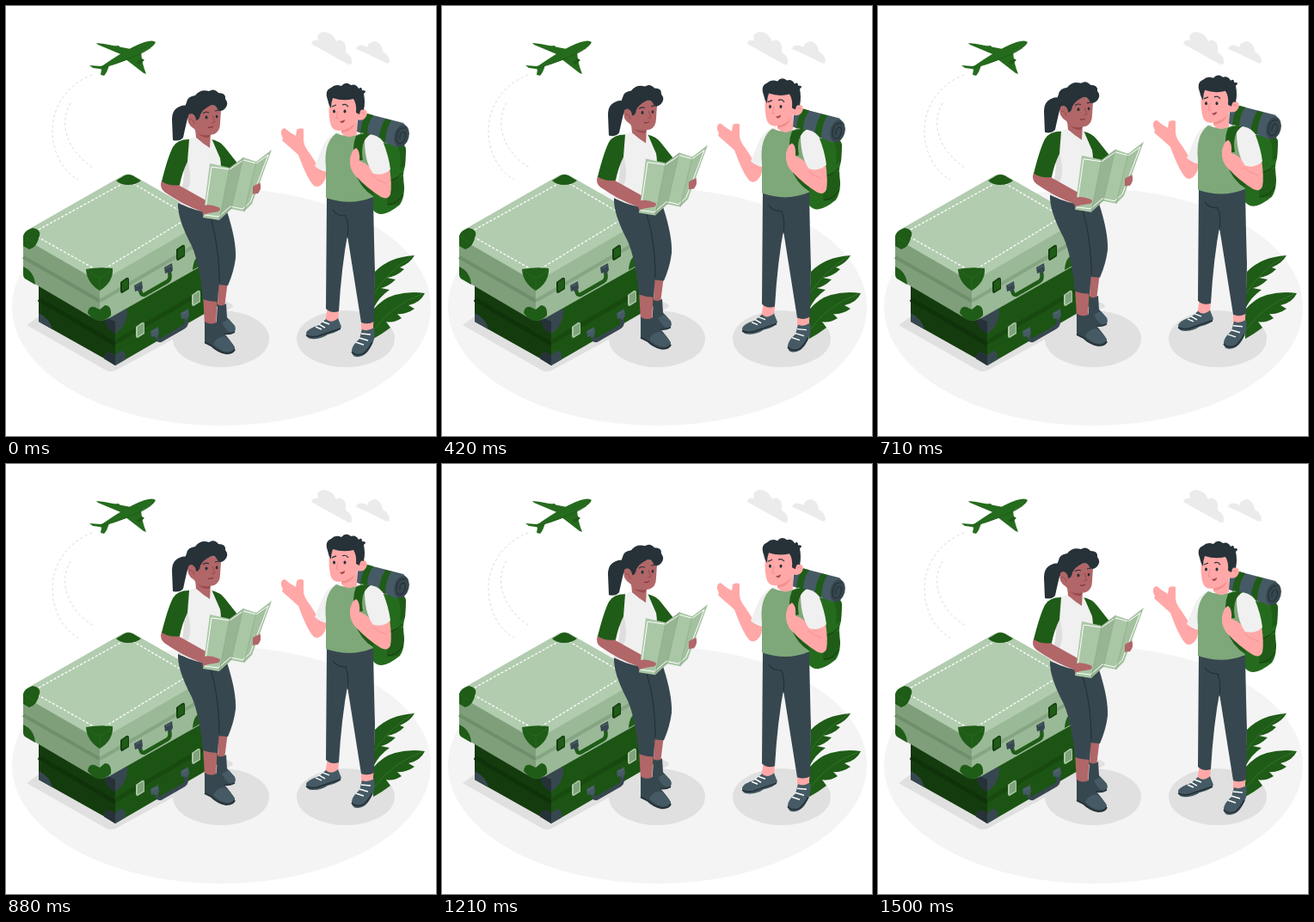
Recreate the animation shown at these times as an HTML page with a canvas. Size 500 by 500 pixels, loop 1.54 s.

```html
<!DOCTYPE html>
<html lang="en">
<head>
<meta charset="utf-8">
<title>Travellers</title>
<style>
html, body { margin: 0; width: 100%; height: 100%; overflow: hidden; background: #fff; }
canvas { display: block; width: 500px; height: 500px; }
</style>
</head>
<body>
<canvas id="stage" width="500" height="500"></canvas>
<script>
const ctx = document.getElementById('stage').getContext('2d');
const LOOP = 1540, STEPS = 37, LIFT = 10;

const green = '#1f5c17', leaf = '#256b1d', deep = '#143b0e', sage = '#a9c7a5',
  slate = '#37474f', steel = '#455a64', ink = '#263238', white = '#fff',
  brown = '#b16668', brownDark = '#9a4a4d', pink = '#ffa8a7', pinkDark = '#f28f8f',
  shadow = '#e0e0e0', cloud = '#ebebeb', cloth = '#f0f0f0', fold = '#dedede';

function fill(color, d) {
  ctx.fillStyle = color;
  ctx.fill(new Path2D(d));
}
function line(color, width, d, dash = []) {
  ctx.strokeStyle = color;
  ctx.lineWidth = width;
  ctx.setLineDash(dash);
  ctx.stroke(new Path2D(d));
}
function oval(color, x, y, rx, ry, turn = 0) {
  ctx.fillStyle = color;
  ctx.beginPath();
  ctx.ellipse(x, y, rx, ry, turn, 0, Math.PI * 2);
  ctx.fill();
}

function ground() {
  oval('#f4f4f4', 250.5, 350, 243.5, 138);
  oval(shadow, 250, 387, 56, 33);
  oval(shadow, 395, 387, 57, 33);
  fill(shadow, 'M24 371L38 361L127 410L246 338L263 347Q265 350 262 351L127 424Q122 426 117 424Z');
}

function sky() {
  fill(cloud, 'M355 44Q356 39 363 40Q360 32 369 30Q379 30 384 41Q389 37 394 43Q396 48 395 54Q403 58 402 66Q401 69 398 68Z');
  fill(cloud, 'M407 50Q409 44 415 46Q418 46 420 48Q422 41 430 41Q438 45 438 53Q446 57 446 65Q445 68 441 66L419 55Z');
  const dots = [3, 3];
  line('#dcdcdc', 1, 'M100 80C70 92 54 118 54 145C54 170 66 192 84 202', dots);
  line('#dcdcdc', 1, 'M75 113C63 132 66 166 103 189', dots);
  fill(leaf, 'M105 43L114 44L145 50L138 58L107 45Z');
  fill(leaf, 'M123 47L131 46L134 50L127 51Z');
  fill(leaf, 'M97 69L110 70L120 67L116 74L101 72Z');
  fill(leaf, 'M109 72L120 68Q118 77 114 81L110 80L111 74Z');
  fill(leaf, 'M138 61L157 53Q158 67 163 79L160 78Z');
  fill(green, 'M151 66L158 61L161 63L155 68Z');
  fill(leaf, 'M109 72C122 62 144 48 161 42Q171 39 174 42Q172 47 160 53Q139 65 117 70Z');
  line(green, 1, 'M112 72Q139 64 161 53Q169 49 173 43');
}

function handle(color, bracket, x, y) {
  ctx.save();
  ctx.translate(x, y);
  line(color, 4.5, 'M2 3Q3 11 8 8L34 -7Q38 -10 36 -17');
  fill(bracket, 'M-5 -2L4 -7L5 1L2 6L-1 4L-4 5Z');
  fill(bracket, 'M30 -23L39 -28L40 -20L37 -15L34 -17L31 -16Z');
  line('#607178', .8, 'M-3 -1L3 -4M32 -22L38 -25');
  ctx.restore();
}
function latch(color, edge, x, y) {
  ctx.save();
  ctx.translate(x, y);
  fill(edge, 'M-5 -4L2 -9Q5 -10 5 -7L5 4L-3 9Q-5 9 -5 6Z');
  fill(color, 'M-3 -4L4 -8L4 3L-3 7Z');
  ctx.restore();
}

function luggage() {
  fill(deep, 'M38 310V367L127 417V355Z');
  fill('#1c5414', 'M127 355V418L246 349V286Z');
  line('#10320b', 5, 'M38 341L127 393');
  line('#184a10', 5, 'M127 391L246 322');
  fill(slate, 'M114 361Q116 354 124 354L141 353Q142 371 127 381Q116 376 114 361');
  fill(ink, 'M114 361L127 367V381Q115 375 114 361');
  fill(slate, 'M114 410Q115 401 122 403L127 406L133 401Q140 400 139 411L127 418Z');
  fill(ink, 'M114 410Q115 401 122 403L127 406V418Z');
  fill(slate, 'M38 357Q51 363 54 376L38 367Z');
  handle(slate, steel, 173, 380);
  latch('#7fa37a', sage, 156, 377);
  latch('#7fa37a', sage, 221, 340);

  fill('#7f9f7b', 'M20 267V312Q20 315 23 317L103 364L109 366V314Z');
  fill('#9ab997', 'M109 314V366Q114 366 120 363L228 302V247Z');
  line('#6f8f6b', 4, 'M20 292L109 343');
  line('#86a583', 4, 'M109 343L228 274');
  fill('#b2ccaf', 'M24 261L136 197Q142 194 148 197L230 244Q234 247 230 251L116 317Q109 321 102 317L24 272Q18 266 24 261');
  line(white, 1.3, 'M38 260L142 203L214 245L109 309L34 267Z', [3, 2]);

  fill(green, 'M93 306Q109 303 124 305Q125 321 109 331Q94 322 93 306');
  line(leaf, 1, 'M94 307L105 315Q109 317 114 314L123 307M109 316V330');
  fill(green, 'M95 357Q96 348 103 350L109 353L115 348Q123 348 122 360Q116 366 109 366Q102 366 95 357');
  fill(green, 'M20 267Q22 261 31 258Q41 260 39 267Q36 281 27 283L20 279Z');
  line(leaf, 1, 'M21 268L32 275');
  fill(green, 'M20 303Q33 309 34 324L22 317Q20 315 20 312Z');
  fill(green, 'M128 203L138 197Q142 195 147 197L157 203Q151 208 142 208Q133 208 128 203');
  fill(green, 'M217 307Q218 291 228 289V301Z');
  handle(green, slate, 154, 327);
  latch(green, deep, 138, 325);
  latch(green, deep, 203, 287);
}

function plants() {
  fill(green, 'M427 352L429 309Q445 292 475 290Q470 299 458 304L463 306Q455 314 443 316L453 318Q445 326 436 328L446 330Q434 338 427 352');
  fill(green, 'M427 387V353Q438 340 452 336Q470 331 487 334Q482 345 468 348L475 352Q465 359 455 358L460 363Q450 369 442 367L447 374Q438 381 427 387');
  line('#3b7b34', .7, 'M428 334Q444 309 472 291M428 376Q450 347 484 335');
}

function woman() {
  fill(ink, 'M211 116Q204 114 197 120Q193 124 193 132L194 156Q202 158 206 153Q209 139 211 131L217 124Z');

  fill(brown, 'M247 319L258 319L254 351H246Z');
  fill(slate, 'M246 347Q251 350 256 346L257 362L266 372Q268 379 263 381L254 382L244 377Z');
  fill(steel, 'M251 368L259 364L266 372Q268 378 263 380Q256 379 251 368');
  line(ink, 1.5, 'M247 379Q257 384 266 379');
  fill(brown, 'M229 335L246 337L244 371H231Z');
  fill(slate, 'M231 367Q239 372 246 367L253 380Q262 390 266 397Q266 404 256 404Q245 402 239 395L231 391Z');
  fill(steel, 'M241 393Q244 385 254 384Q262 390 266 397Q265 402 256 402Q247 400 241 393');
  line(ink, 2, 'M231 391L239 395Q246 402 256 404Q264 404 266 399');

  fill(slate, 'M234 236L257 239Q268 273 267 293Q265 309 258 325L246 324L230 271Z');
  fill(slate, 'M200 229Q220 237 246 236Q238 252 244 272Q249 298 248 319L246 344Q237 344 229 341Q225 300 216 279Q199 247 200 229');
  line(ink, 1.2, 'M237 244Q248 278 248 322');

  fill(green, 'M239 155Q249 157 255 165L270 184L254 194L244 183Z');
  fill(cloth, 'M212 155L220 152Q230 165 239 154L249 177Q252 193 246 224L229 239Q210 235 200 228Q209 207 206 178Z');
  fill(fold, 'M211 179Q216 197 213 209L204 231L200 228Q207 209 207 190Z');
  fill(brown, 'M220 143L221 153Q229 160 237 165L238 147Z');
  fill(brownDark, 'M223 148L238 149L236 153Q229 154 223 148');

  fill(brown, 'M181 203Q178 211 184 216Q207 232 228 239L236 228L202 209L202 203Z');
  fill(green, 'M213 155Q199 155 194 164Q188 176 181 204Q191 210 202 208Q205 193 211 181Z');

  fill(brown, 'M212 127Q209 137 219 143L222 148Q230 152 242 149Q249 146 249 136L250 121L232 109L215 117Z');
  fill(ink, 'M210 131Q206 119 210 112Q211 105 220 104Q226 96 236 99Q242 95 247 101Q256 101 255 108Q260 114 254 120Q248 125 245 118Q241 113 237 116Q229 120 226 126Q225 133 221 133Q221 127 216 125Q211 125 210 131');
  line(brownDark, 1, 'M213 132Q217 130 219 137M240 127L243 135L239 136');
  oval(ink, 233, 129.5, 1.5, 2);
  oval(ink, 245, 128.5, 1.3, 1.9);
  line(ink, 1.1, 'M229 125Q232 122 236 124M243 122L248 121');
  line('#7f2f37', 1.1, 'M235 141Q238 142 241 140');

  fill(brown, 'M286 207Q289 202 295 204Q298 212 293 218L285 219Z');
  fill(sage, 'M237 183L260 188L248 249L229 246Z');
  fill('#97b493', 'M260 188L276 176L262 236L248 249Z');
  fill(sage, 'M276 176L291 181L277 239L262 236Z');
  fill('#a3c19f', 'M291 181L309 167L286 230L277 239Z');
  line(white, 1, 'M231 243L239 187L260 190L276 179L291 183L305 173L284 228L275 236L261 233L247 245Z');
  line('#83a37f', .7, 'M260 188L248 249M276 176L262 236M291 181L277 239');
  fill(brown, 'M227 233Q235 229 247 234Q251 236 247 239L235 241L229 243Z');
  fill(brown, 'M287 210L294 206Q298 212 293 217L287 219Z');
}

function pack() {
  fill(leaf, 'M423 158L452 160Q463 157 465 167L464 186Q460 199 463 211Q463 224 458 231Q446 241 437 242Q430 242 426 236Z');
  fill(green, 'M454 160Q463 157 465 167L464 186L458 190Q461 174 454 160');
  fill(green, 'M444 203L462 198L463 213L457 231L443 232Z');
  line(deep, 1, 'M434 205Q453 204 461 194M444 231Q456 230 462 219');
  fill(steel, 'M409 130Q412 124 419 125L462 136Q470 143 468 153Q464 164 454 164L408 146Z');
  oval(slate, 460, 151, 8.5, 13, .25);
  line(ink, 1.2, 'M465 142Q455 140 454 153Q454 162 461 159Q467 151 463 146Q457 147 458 155');
  fill(green, 'M420 125L427 127Q420 137 420 149L412 147Q414 132 420 125');
  fill(green, 'M441 131L448 133Q441 144 441 159L433 156Q435 141 441 131');
}

function man() {
  pack();
  fill(pink, 'M374 350L387 353L386 369L371 368Z');
  fill(steel, 'M349 380Q351 375 364 371L372 364Q378 370 386 363L390 373Q388 379 374 382Q366 388 355 387Q349 387 349 380');
  line(ink, 1.8, 'M349 383Q358 387 368 382Q380 378 389 375');
  line(white, 1.5, 'M360 373L367 376M364 370L371 374M368 367L376 370');
  fill(pink, 'M413 362L428 362L426 381H413Z');
  fill(steel, 'M402 400Q403 394 411 387L414 376Q420 379 428 374Q430 386 426 392Q420 408 408 408Q402 408 402 400');
  line(ink, 1.8, 'M402 402Q407 408 416 404Q421 400 426 391');
  line(white, 1.5, 'M407 391L416 394M411 386L421 389M413 381L424 382');

  fill(slate, 'M392 227L427 222Q428 278 429 309L428 367Q421 371 413 368L397 267Z');
  fill(slate, 'M373 220L404 226L398 261Q390 303 387 355Q378 358 372 352Z');
  line(ink, 1.2, 'M380 237Q384 244 395 244Q399 253 397 270');

  fill(pink, 'M320 149Q319 143 324 142Q331 148 337 151L338 144Q341 141 346 143L346 157Q347 164 353 171L362 185L374 188L371 202Q365 213 358 209Q350 201 340 173L323 158Q320 156 322 154Z');
  line(pinkDark, .7, 'M361 187L367 193');
  fill(cloth, 'M389 146Q376 149 370 160Q362 178 359 186Q365 192 374 193L382 169Z');
  fill('#7ea879', 'M384 148Q399 155 415 147Q423 157 426 184L427 222Q401 233 372 223V188Q369 159 384 148');
  fill(green, 'M405 192Q412 212 427 221V213Q416 207 411 194Z');
  fill(pink, 'M427 188L446 188Q449 209 447 219Q444 226 436 222Q420 212 407 198Q399 190 400 178L404 168Q410 164 412 171L411 180Q423 184 429 196Z');
  fill(cloth, 'M417 149Q431 148 438 157Q445 174 447 190Q439 198 427 195Q416 181 417 149');
  fill(green, 'M407 151Q415 147 424 149Q411 157 415 179L407 180Q401 166 407 151');
  fill(pink, 'M400 179Q401 168 407 165Q412 168 411 180L417 186L408 199Q401 193 400 179');
  line(pinkDark, .8, 'M425 197Q434 204 442 206');

  fill(pink, 'M391 137L390 148Q399 156 408 149V128Z');
  fill(pinkDark, 'M390 144Q400 143 406 136Q402 147 390 147Z');
  fill(pink, 'M377 107Q374 122 377 136Q379 146 389 145Q402 143 407 132Q418 135 420 125Q419 118 412 121L412 106Q392 99 377 107');
  fill(ink, 'M374 109Q370 98 378 95Q383 90 390 93Q395 87 401 92Q407 90 410 96Q414 93 414 98Q421 98 416 102Q418 112 416 121Q412 119 411 126L407 124Q408 114 404 108Q392 111 380 107Q378 112 378 119Q375 115 374 109');
  oval(ink, 381.5, 122.5, 1.5, 2);
  oval(ink, 394, 122.5, 1.5, 2);
  line(ink, 1.2, 'M379 117L384 115M391 115Q395 113 398 117');
  line(pinkDark, 1.1, 'M386 122L384 130L387 131M413 125Q416 122 417 126');
  fill('#a04a52', 'M388 134Q391 134 394 132Q394 136 390 136Z');
}

function draw(step) {
  const phase = (step + .5) / STEPS;
  const rise = LIFT * (1 - Math.abs(2 * phase - 1));
  ctx.fillStyle = white;
  ctx.fillRect(0, 0, 500, 500);
  ground();
  sky();
  luggage();
  plants();
  ctx.save();
  ctx.translate(0, .3 - rise);
  woman();
  man();
  ctx.restore();
}

const start = performance.now();
let shown = -1;
function tick() {
  const time = (performance.now() - start) % LOOP;
  const step = Math.floor(time / LOOP * STEPS);
  if (step !== shown) draw(shown = step);
  requestAnimationFrame(tick);
}
tick();
</script>
</body>
</html>
```
